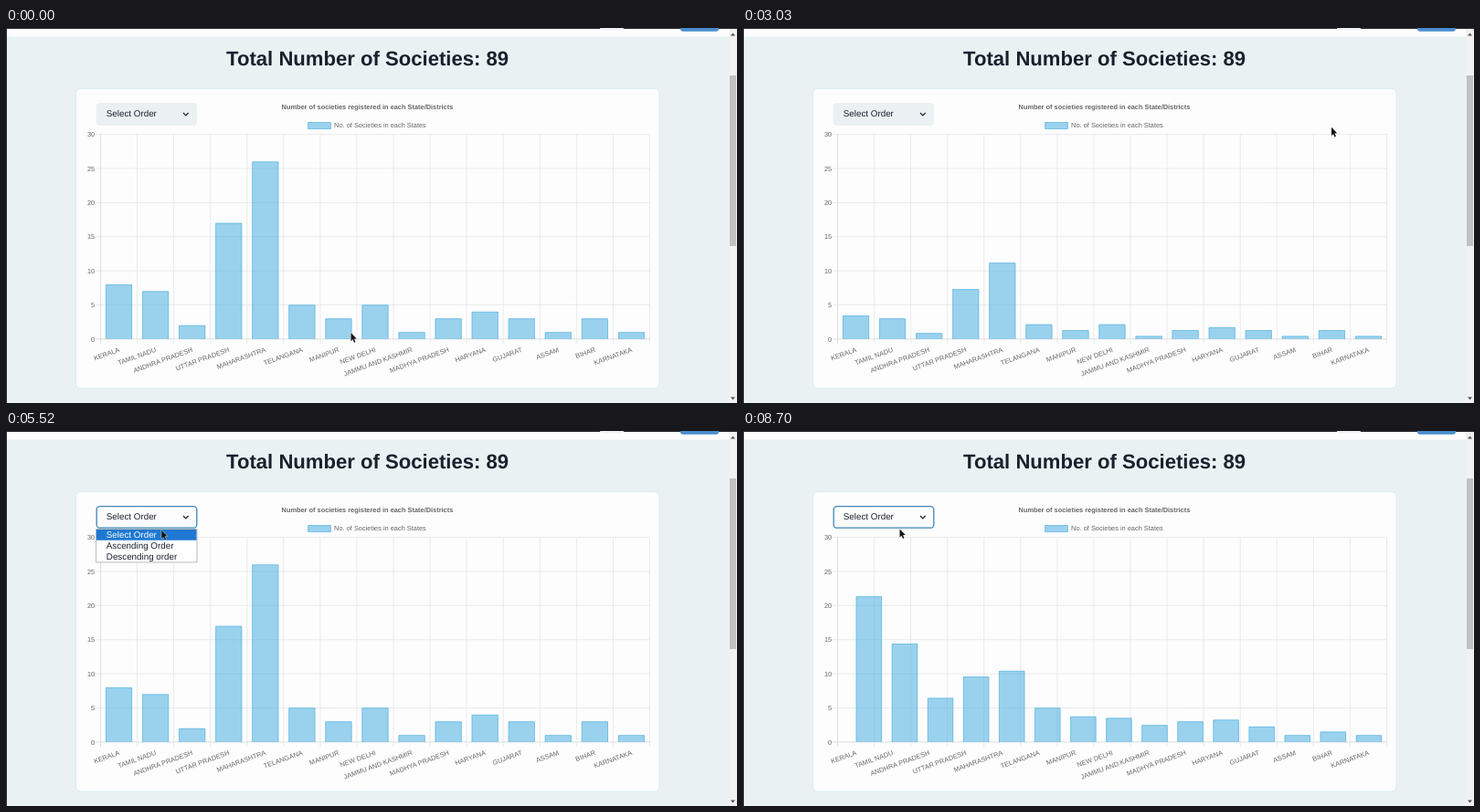
Animation, 800 px wide and 411 px high, one loop 8.73 s. Source, as an HTML page with a canvas:

```html
<!DOCTYPE html>
<html lang="en">
<head>
<meta charset="utf-8">
<title>Societies chart</title>
<style>
html, body { margin: 0; width: 100%; height: 100%; overflow: hidden; }
canvas { display: block; }
</style>
</head>
<body>
<canvas id="stage" width="800" height="411"></canvas>
<script>
const ctx = document.getElementById('stage').getContext('2d');
ctx.textRendering = 'geometricPrecision';
const LOOP = 8730;
const FONT = '"Liberation Sans", Arial, sans-serif';
const SMALL = 7.4;
const FILL = 'rgba(57,167,224,0.5)';
const HOVER = 'rgba(45,165,232,0.53)';
const EDGE = '#63b8e1';

const states = [
  ['KERALA', 8], ['TAMIL NADU', 7], ['ANDHRA PRADESH', 2], ['UTTAR PRADESH', 17],
  ['MAHARASHTRA', 26], ['TELANGANA', 5], ['MANIPUR', 3], ['NEW DELHI', 5],
  ['JAMMU AND KASHMIR', 1], ['MADHYA PRADESH', 3], ['HARYANA', 4], ['GUJARAT', 3],
  ['ASSAM', 1], ['BIHAR', 3], ['KARNATAKA', 1]
];
const districts = [
  ['BEED', 4], ['AHMEDNAGAR', 5], ['NASIK', 2], ['BULDHANA', 1], ['OSMANABAD', 1],
  ['KOLHAPUR', 3], ['SANGLI', 2], ['BHANDARA', 1], ['NAGPUR', 2], ['SOLAPUR', 1],
  ['JALGAON', 1], ['MUMBAI', 1], ['THANE', 2]
];
const options = ['Select Order', 'Ascending Order', 'Descending order'];
const TOP = 116.6, RIGHT = 704.5;

const stateView = (start, left, data, order, morph) => ({
  start, left, data, order, morph, bottom: 340.9, max: 30, step: 5, digits: 0, angle: 20,
  legend: 'No. of Societies in each States'
});
const views = [
  stateView(-2000, 103.5, states, 0, false),
  { start: 1592, left: 105, data: districts, order: 0, morph: false, bottom: 353, max: 5,
    step: 0.5, digits: 1, angle: 16, legend: 'No. of Societies in each MAHARASHTRA districts' },
  stateView(2900, 103.5, states, 0, false),
  stateView(5952, 144.5, [...states].sort((a, b) => a[1] - b[1]), 1, true),
  stateView(7468, 123.5, [...states].sort((a, b) => b[1] - a[1]), 2, true),
  stateView(8629, 103.5, states, 0, true)
];

// time, x, y of the pointer tip
const path = [
  [0, 377.5, 334], [250, 377.5, 334], [560, 345, 285], [800, 299, 250], [1050, 286, 240],
  [1600, 286, 240], [2060, 572, 150], [2450, 680, 91], [2950, 680, 91], [3400, 480, 190],
  [3760, 298, 272], [3850, 254, 292], [4300, 248, 288], [4390, 227, 240], [4480, 202, 186],
  [4800, 172, 96], [5380, 172, 96], [5700, 168, 125], [5950, 168, 125], [6280, 175, 96],
  [6850, 175, 96], [7120, 172, 137], [7270, 172, 137], [7467, 175, 136], [7550, 175.7, 112.8],
  [7780, 172, 97], [8150, 172, 97], [8420, 170, 113], [8640, 170, 113], [8700, 171.5, 107.5],
  [8730, 172, 105]
];
const menus = [[5380, 5952], [6880, 7468], [8180, 8629]];
const hands = [[800, 1640], [2400, 3000], [3770, 4400]];
const inside = (t, spans) => spans.some(([a, b]) => t >= a && t < b);
const clamp = v => Math.max(0, Math.min(1, v));
const mix = (a, b, k) => a + (b - a) * k;
const easeOut = p => 1 - (1 - clamp(p)) ** 4;

function pointerAt(t) {
  const i = Math.max(1, path.findIndex(p => p[0] > t));
  const [a, b] = [path[i - 1], path[i]];
  const k = (t - a[0]) / (b[0] - a[0]);
  return { x: mix(a[1], b[1], k), y: mix(a[2], b[2], k) };
}

function text(str, x, y, { size = SMALL, color = '#666', align = 'left', bold = false } = {}) {
  ctx.font = `${bold ? 'bold ' : ''}${size}px ${FONT}`;
  ctx.fillStyle = color;
  ctx.textAlign = align;
  ctx.textBaseline = 'alphabetic';
  ctx.fillText(str, x, y);
}

function box(x, y, w, h, r, fill, stroke, lineWidth = 1) {
  ctx.beginPath();
  ctx.roundRect(x, y, w, h, r);
  if (fill) { ctx.fillStyle = fill; ctx.fill(); }
  if (stroke) { ctx.strokeStyle = stroke; ctx.lineWidth = lineWidth; ctx.stroke(); }
}

function line(points, color, width = 1) {
  ctx.beginPath();
  points.forEach(([x, y]) => ctx.lineTo(x, y));
  ctx.strokeStyle = color;
  ctx.lineWidth = width;
  ctx.stroke();
}

function shape(points, fill, stroke) {
  ctx.beginPath();
  points.forEach(([x, y]) => ctx.lineTo(x, y));
  ctx.closePath();
  if (stroke) { ctx.strokeStyle = stroke; ctx.lineWidth = 1; ctx.stroke(); }
  ctx.fillStyle = fill;
  ctx.fill();
}

function drawPage() {
  ctx.fillStyle = '#eaf1f3';
  ctx.fillRect(0, 0, 800, 411);
  ctx.fillStyle = '#fefdfe';
  ctx.fillRect(0, 0, 791, 9.5);
  ctx.fillStyle = '#f1f1f1';
  ctx.fillRect(791, 0, 9, 411);
  ctx.fillStyle = '#c1c1c1';
  ctx.fillRect(792, 52, 7, 187);
  shape([[793, 8.5], [798, 8.5], [795.5, 5.5]], '#505050');
  shape([[793, 404.5], [798, 404.5], [795.5, 407.5]], '#505050');
  ctx.fillStyle = '#2c2c2e';
  ctx.fillRect(0, 0, 800, 1);
  ctx.fillRect(0, 0, 1, 411);
  box(738, -6, 42, 9.7, 3, '#4a8dce');
  box(650, -6, 26, 8.5, 3, '#eef2f5');
  text('Total Number of Societies: 89', 395.6, 40.5,
    { size: 22.1, color: '#1a202c', align: 'center', bold: true });
  box(76.5, 66.5, 638.5, 328.5, 5, '#fefdfe', '#dcecee');
}

function barsOf(view) {
  const pitch = (RIGHT - view.left) / view.data.length;
  return view.data.map(([, value], i) => ({ x: view.left + pitch * (i + 0.5), w: pitch * 0.72, value }));
}

function currentBars(index, t) {
  const view = views[index], k = easeOut((t - view.start) / 1000);
  const old = view.morph ? barsOf(views[index - 1]) : null;
  return barsOf(view).map((bar, i) => {
    const from = old ? old[i] : { ...bar, value: 0 };
    return { x: mix(from.x, bar.x, k), w: mix(from.w, bar.w, k), value: mix(from.value, bar.value, k) };
  });
}

function drawLegend(label) {
  text('Number of societies registered in each State/Districts', 395.4, 89,
    { size: 7.4, align: 'center', bold: true });
  ctx.font = `${SMALL}px ${FONT}`;
  const left = 395.2 - (ctx.measureText(label).width + 28.5) / 2;
  box(left, 103.5, 24.8, 7, 0, FILL, EDGE, 0.8);
  text(label, left + 28.5, 109.4);
}

function drawAxes(view) {
  const { left, bottom, data, max, step, digits, angle } = view;
  const grid = '#e3e8e9', axis = '#d3d8da', thin = 0.85;
  const rows = max / step, pitch = (RIGHT - left) / data.length;
  for (let i = 0; i <= rows; i++) {
    const y = mix(bottom, TOP, i / rows);
    line([[left - 5, y], [RIGHT, y]], i ? grid : axis, thin);
    text(i ? (i * step).toFixed(digits) : '0', left - 6.3, y + 2.6, { align: 'right' });
  }
  for (let i = 0; i <= data.length; i++) {
    const x = left + i * pitch;
    line([[x, TOP], [x, bottom + 5]], i ? grid : axis, thin);
  }
  data.forEach(([name], i) => {
    ctx.save();
    ctx.translate(left + (i + 0.5) * pitch + 0.3, bottom + 11.2);
    ctx.rotate(-angle * Math.PI / 180);
    text(name, 0, 2.6, { align: 'right' });
    ctx.restore();
  });
}

function drawBars(view, bars, hovered) {
  const unit = (view.bottom - TOP) / view.max;
  ctx.save();
  ctx.beginPath();
  ctx.rect(view.left, TOP - 1, RIGHT - view.left, view.bottom - TOP + 1);
  ctx.clip();
  bars.forEach(({ x, w, value }, i) => {
    const y = view.bottom - value * unit;
    ctx.fillStyle = i === hovered ? HOVER : FILL;
    ctx.fillRect(x - w / 2, y, w, view.bottom - y);
    const l = x - w / 2 + 0.3, r = x + w / 2 - 0.3;
    line([[l, view.bottom], [l, y + 0.3], [r, y + 0.3], [r, view.bottom]], EDGE, 0.75);
  });
  ctx.restore();
}

function hoveredBar(t) {
  if (t >= 800 && t < 1592 || t >= 3780 && t < 3870) return 4;
  return t >= 3870 && t < 4395 ? 3 : -1;
}

function drawTooltip(t) {
  let alpha, item = 4, x = 283.8, y = 147;
  if (t < 1592) alpha = clamp((t - 800) / 200);
  else if (t > 3780 && t < 4600) alpha = Math.min(clamp((t - 3783) / 200), clamp((4597 - t) / 200));
  if (!alpha) return;
  if (t >= 3870) {
    const k = easeOut((t - 3870) / 400);
    item = 3;
    x = mix(x, 243.7, k);
    y = mix(y, 214, k);
  }
  const [name, value] = states[item];
  const left = x + 4.3, top = y - 14;
  ctx.save();
  ctx.globalAlpha = alpha;
  ctx.beginPath();
  ctx.roundRect(left, top, 129.3, 28.3, 4);
  ctx.moveTo(left, y - 3);
  ctx.lineTo(left - 3.2, y);
  ctx.lineTo(left, y + 3);
  ctx.closePath();
  ctx.fillStyle = 'rgba(0,0,0,0.8)';
  ctx.fill();
  text(name, left + 3.6, top + 10, { color: '#fff', bold: true });
  box(left + 3.8, top + 16.5, 7, 7, 0, '#fff');
  box(left + 4.4, top + 17.1, 5.8, 5.8, 0, FILL, EDGE, 0.6);
  text(`No. of Societies in each States: ${value}`, left + 12.4, top + 22.4, { color: '#fff' });
  ctx.restore();
}

function drawSelect(order, focused) {
  if (focused) box(99.2, 82.6, 109.6, 23.6, 3.5, '#fefdfe', '#3f87ba', 1.3);
  else box(98.5, 82, 110.5, 25, 4, '#ebf1f3');
  text(options[order], 109.8, 97.3, { size: 9.82, color: '#1a202c' });
  line([[194, 93], [196.8, 95.8], [199.6, 93]], '#1a202c', 1.2);
}

function drawMenu(order, pointer) {
  const top = 107.5, row = 11.8;
  const over = Math.floor((pointer.y - top) / row);
  const active = over >= 0 && over < options.length ? over : order;
  box(98.5, top, 110.5, row * 3 + 1, 0, '#fff', '#9a9fa3', 0.7);
  options.forEach((label, i) => {
    const y = top + 0.5 + i * row;
    if (i === active) box(99, y, 109.5, row, 0, '#1e78d2');
    text(label, 109.8, y + 9.3, { size: 9.82, color: i === active ? '#fff' : '#1a202c' });
  });
}

function drawBackButton() {
  box(667, 82.5, 25.3, 14.6, 3, '#fefdfe', '#3580b5');
  line([[679.7, 94.5], [679.7, 86]], '#2b78b0', 1.3);
  line([[675.6, 90], [679.7, 85.8], [683.8, 90]], '#2b78b0', 1.3);
}

function drawPointer({ x, y }, hand) {
  ctx.save();
  ctx.translate(x, y);
  if (hand) {
    shape([[-0.8, 0.5], [0.8, 0.5], [1.2, 4], [5.4, 5], [6, 7], [5, 11], [-0.5, 11], [-3.6, 7], [-3, 6], [-0.8, 7]],
      '#161616', '#f4f4f4');
  } else {
    ctx.scale(0.88, 0.92);
    shape([[0, 0], [0, 10], [2.3, 8], [4, 11.6], [5.6, 10.8], [4, 7.3], [7, 7]], '#161616', '#f4f4f4');
  }
  ctx.restore();
}

function draw(t) {
  const index = views.findLastIndex(v => v.start <= t);
  const view = views[index], pointer = pointerAt(t);
  drawPage();
  drawLegend(view.legend);
  drawAxes(view);
  drawBars(view, currentBars(index, t), hoveredBar(t));
  drawTooltip(t);
  drawSelect(view.order, t >= menus[0][0]);
  if (view.data === districts) drawBackButton();
  if (inside(t, menus)) drawMenu(view.order, pointer);
  drawPointer(pointer, inside(t, hands));
}

const begin = performance.now();
function tick() {
  draw((performance.now() - begin) % LOOP);
  requestAnimationFrame(tick);
}
tick();
</script>
</body>
</html>
```
